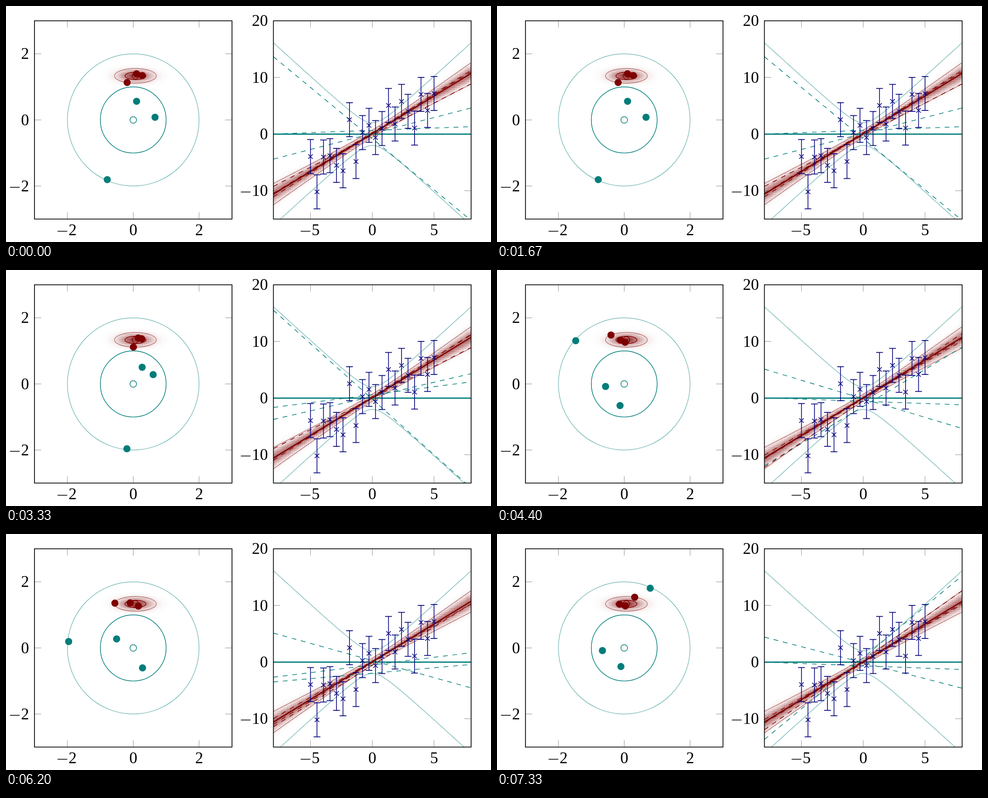
Write an HTML page with a canvas that moves like this. It is 1073x522 px and loops after 7.39 s.

```html
<!DOCTYPE html>
<html lang="en">
<head>
<meta charset="utf-8">
<style>
html, body { margin: 0; width: 100%; height: 100%; overflow: hidden; background: #fff; }
canvas { display: block; }
</style>
</head>
<body>
<canvas id="stage" width="1073" height="522"></canvas>
<script>
const TEAL = '#007d7a', RED = '#7d0000', NAVY = '#00007d';
const LOOP = 7390, FPS = 15, THIN = 1.45, THICK = 2.9;
// Ticks on which the picture holds for one more tick
const HOLDS = [1, 7, 13, 19, 24, 29, 35, 40, 46, 51, 57, 60, 69, 74, 79, 82, 88, 96, 101, 106];
const STEPS_PER_TURN = 20;

const prior = { color: TEAL, mean: [0, 0], sd: [1, 1] };
const posterior = { color: RED, mean: [0.066, 1.333], sd: [0.318, 0.111] };

// Samples circle the origin: radius, start angle in degrees, direction
const samples = [[0.667, 7, 1], [0.573, 79.8, -1], [1.971, -113.6, 1]];

const dataY = [333, 411, 334, 331, 352.5, 364.5, 251.5, 344, 280, 264,
  291, 271, 220, 261, 211, 233, 270, 195.5, 231, 193.5];

function panel(left, right, xMin, xMax, yMin, yMax, xTicks, yTicks) {
  const top = 32.7, bottom = 471.3;
  const sx = (right - left) / (xMax - xMin), sy = (bottom - top) / (yMax - yMin);
  return {
    left, right, top, bottom, sx, sy, xMin, xMax, yMin, yMax, xTicks, yTicks,
    x: v => left + (v - xMin) * sx,
    y: v => bottom - (v - yMin) * sy
  };
}
const weights = panel(63, 500, -3, 3, -3, 3, [-2, 0, 2], [-2, 0, 2]);
const plot = panel(591.6, 1029, -8, 8, -15, 20, [-5, 0, 5], [-10, 0, 10, 20]);

let g;

function newLayer(w, h) {
  const c = document.createElement('canvas');
  c.width = w;
  c.height = h;
  return c;
}

function stroke(color, width, alpha = 1, dash = []) {
  g.strokeStyle = color;
  g.lineWidth = width;
  g.globalAlpha = alpha;
  g.setLineDash(dash);
  g.stroke();
  g.globalAlpha = 1;
}

function segments(list, color, width) {
  g.beginPath();
  for (const [x1, y1, x2, y2] of list) {
    g.moveTo(x1, y1);
    g.lineTo(x2, y2);
  }
  stroke(color, width);
}

function curve(f, steps, ...style) {
  g.beginPath();
  for (let i = 0; i <= steps; i++) {
    const x = -8 + 16 * i / steps;
    g.lineTo(plot.x(x), plot.y(f(x)));
  }
  stroke(...style);
}

function ellipse([cx, cy], rx, ry, ...style) {
  g.beginPath();
  g.ellipse(weights.x(cx), weights.y(cy), rx * weights.sx, ry * weights.sy, 0, 0, 7);
  stroke(...style);
}

function clipped(p, draw) {
  g.save();
  g.beginPath();
  g.rect(p.left, p.top, p.right - p.left, p.bottom - p.top);
  g.clip();
  draw();
  g.restore();
}

const line = ([a, b]) => x => a + b * x;
const spread = ({ sd: [a, b] }, x) => Math.hypot(a, b * x);
const bell = z => Math.exp(-z * z / 2);

// Coarse shading from a density given in panel coordinates
function shade(p, density) {
  const n = 100, layer = newLayer(n, n), c = layer.getContext('2d');
  const img = c.createImageData(n, n);
  for (let j = 0; j < n; j++) for (let i = 0; i < n; i++) {
    const x = p.xMin + (i + 0.5) / n * (p.xMax - p.xMin);
    const y = p.yMax - (j + 0.5) / n * (p.yMax - p.yMin);
    const k = 4 * (j * n + i);
    img.data[k] = 125;
    img.data[k + 3] = 255 * density(x, y);
  }
  c.putImageData(img, 0, 0);
  g.imageSmoothingEnabled = false;
  g.drawImage(layer, p.left, p.top, p.right - p.left, p.bottom - p.top);
}

function ticks(p) {
  const len = 15, list = [];
  for (const v of p.xTicks) {
    const x = p.x(v);
    list.push([x, p.bottom, x, p.bottom - len], [x, p.top, x, p.top + len]);
  }
  for (const v of p.yTicks) {
    const y = p.y(v);
    list.push([p.left, y, p.left + len, y], [p.right, y, p.right - len, y]);
  }
  segments(list, '#808080', 0.9);
}

// Number whose right edge is at x; the wide minus sign is a rule
function label(v, x, baseline) {
  const digits = String(Math.abs(v));
  g.fillText(digits, x, baseline);
  if (v < 0) g.fillRect(x - g.measureText(digits).width - 24.5, baseline - 9.5, 21.5, 1.6);
}

function frame(p) {
  g.setLineDash([]);
  g.strokeStyle = g.fillStyle = '#000';
  g.lineWidth = 1.7;
  g.strokeRect(p.left, p.top, p.right - p.left, p.bottom - p.top);
  g.font = '35.5px "Liberation Serif", "Times New Roman", serif';
  g.textAlign = 'right';
  for (const v of p.xTicks) label(v, p.x(v) + (v < 0 ? 20.5 : 9), 507);
  for (const v of p.yTicks) label(v, p.left - 12, p.y(v) + 11.5);
}

function drawBase() {
  const [mx, my] = posterior.mean, [sx, sy] = posterior.sd;
  shade(weights, (x, y) => 0.78 * bell((x - mx) / sx) * bell((y - my) / sy));
  shade(plot, (x, y) => 0.55 * bell((y - line(posterior.mean)(x)) / spread(posterior, x)));
  ticks(weights);
  ticks(plot);
  for (const { color, mean, sd } of [prior, posterior]) {
    ellipse(mean, 0.1, 0.1, color, THIN);
    ellipse(mean, sd[0], sd[1], color, THIN);
    ellipse(mean, 2 * sd[0], 2 * sd[1], color, THIN, 0.5);
  }
  clipped(plot, () => {
    for (const m of [prior, posterior]) {
      curve(line(m.mean), 1, m.color, THICK);
      for (const k of [-2, 2])
        curve(x => line(m.mean)(x) + k * spread(m, x), 160, m.color, THIN, 0.5);
    }
  });
}

function drawTop() {
  const bar = 3 * plot.sy, cap = 7.5, r = 5, list = [];
  dataY.forEach((y, i) => {
    const x = plot.x(-5 + 10 * i / 19);
    list.push([x, y - bar, x, y + bar],
      [x - cap, y - bar, x + cap, y - bar], [x - cap, y + bar, x + cap, y + bar],
      [x - r, y - r, x + r, y + r], [x - r, y + r, x + r, y - r]);
  });
  segments(list, NAVY, 1.6);
  frame(weights);
  frame(plot);
}

function layer(draw) {
  const c = newLayer(1073, 522);
  g = c.getContext('2d');
  draw();
  return c;
}
const base = layer(drawBase), overlay = layer(drawTop);
const screen = document.getElementById('stage').getContext('2d');

function render(time) {
  const tick = Math.floor(time % LOOP * FPS / 1000 + 0.06);
  const step = tick - HOLDS.filter(h => h <= tick).length;
  const turn = 2 * Math.PI * step / STEPS_PER_TURN;

  g = screen;
  g.fillStyle = '#fff';
  g.fillRect(0, 0, 1073, 522);
  g.drawImage(base, 0, 0);
  for (const { color, mean, sd } of [prior, posterior]) {
    for (const [r, start, dir] of samples) {
      const a = start * Math.PI / 180 + dir * turn;
      const w = [mean[0] + sd[0] * r * Math.cos(a), mean[1] + sd[1] * r * Math.sin(a)];
      clipped(plot, () => curve(line(w), 1, color, THIN, 1, [10.5, 10.5]));
      g.fillStyle = color;
      g.beginPath();
      g.arc(weights.x(w[0]), weights.y(w[1]), 7.9, 0, 7);
      g.fill();
    }
  }
  g.drawImage(overlay, 0, 0);
}

const begin = performance.now();
function loop() {
  render(performance.now() - begin);
  requestAnimationFrame(loop);
}
loop();
</script>
</body>
</html>
```
